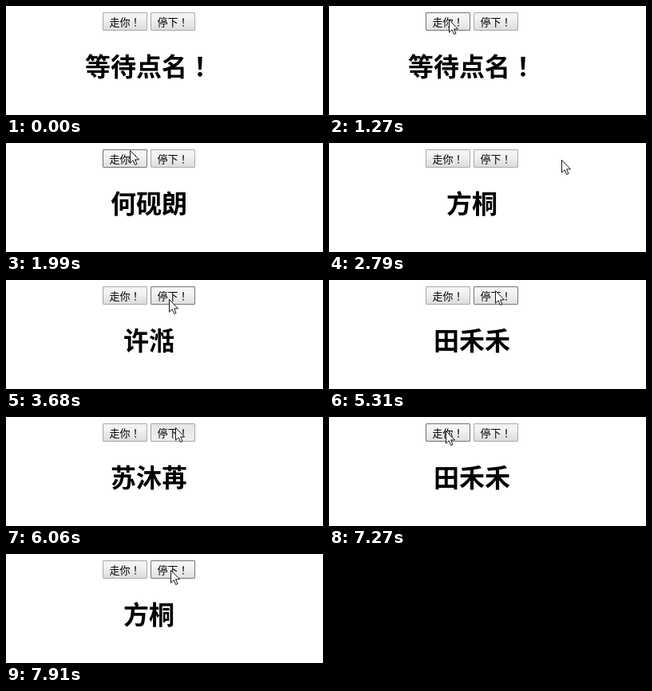
These frames come from a looping animation (397 by 137 pixels, 7.99 s). An HTML page:

```html
<!DOCTYPE html>
<html lang="zh-CN">
<head>
<meta charset="utf-8">
<title>点名</title>
<style>
  html, body { margin: 0; width: 100%; height: 100%; overflow: hidden; background: #fff; }
  #stage {
    position: relative; width: 397px; height: 137px; overflow: hidden; color: #000;
    font-family: "Noto Sans CJK SC", "Noto Sans CJK", sans-serif;
  }
  #stage i { font-style: normal; font-family: "Noto Sans CJK TC", "Noto Sans CJK JP", sans-serif; }
  .btn {
    position: absolute; top: 8px; box-sizing: border-box; width: 56px; height: 23px;
    border: 1px solid #a9a9a5; border-radius: 1px;
    background: linear-gradient(#f3f3f3 30%, #dcdcdc);
    font-size: 13px; line-height: 21px; text-align: center; white-space: nowrap;
  }
  .btn.hover { border-color: #70747c; background: linear-gradient(#f4f4f4 30%, #e0e0e0); }
  .btn.down { border-color: #a5a5a5; background: linear-gradient(#e6e6e6, #efefef); }
  #go { left: 121px; }
  #stop { left: 181px; }
  h1 {
    position: absolute; left: 0; top: 53px; width: 358px; margin: 0;
    font-size: 32px; line-height: 42px; font-weight: 700; text-align: center; white-space: nowrap;
  }
  #cursor { position: absolute; left: 0; top: 0; width: 13px; height: 20px; overflow: visible; }
</style>
</head>
<body>
<div id="stage">
  <div class="btn" id="go">走你<i lang="zh-TW">！</i></div>
  <div class="btn" id="stop">停下<i lang="zh-TW">！</i></div>
  <h1 id="name"></h1>
  <svg id="cursor" viewBox="0 0 13 20">
    <path d="M.5 .5V16.2L4.1 12.8L6.6 18.5L9 17.5L6.5 11.9H11.5Z" fill="#fff" stroke="#15151f"/>
  </svg>
</div>
<script>
const LOOP = 7990, ENTER = 690, MOVE_STEP = 64, ROLL_STEP = 70, HOLD = 200;
const WAITING = '等待点名<i lang="zh-TW">！</i>';
const pool = ['许湉', '田禾禾', '何砚朗', '陆苇', '周予棠', '沈知禾', '罗青屿', '方桐', '顾芃', '韩若汀', '苏沐苒'];

// Rolling spells, each with the name it stops on
const runs = [
  { from: 1450, to: 3680, last: '许湉' },
  { from: 4540, to: 5570, last: '罗青屿' },
  { from: 5750, to: 6060, last: '苏沐苒' },
  { from: 6950, to: 7910, last: '方桐' }
];
const clicks = [1450, 3480, 4540, 6060, 6950];

// Pointer moves: start, end, x, y
const entry = [325, 137];
const moves = [
  [ENTER, 1270, 150, 17],
  [1600, 1800, 155, 9],
  [2020, 2210, 291, 21],
  [2860, 3050, 213, 23],
  [3100, 3680, 204, 24],
  [4110, 4290, 146, 16],
  [4900, 5310, 208, 13],
  [5380, 5570, 212, 13],
  [6510, 6700, 146, 17],
  [7300, 7720, 206, 20]
];

const el = id => document.getElementById(id);
const cursor = el('cursor'), heading = el('name');
const buttons = [el('go'), el('stop')].map(node => ({ node, left: node.offsetLeft }));
const ease = f => f * f * (3 - 2 * f);

function tip(t) {
  let [x, y] = entry;
  for (const [start, end, tx, ty] of moves) {
    if (t < start) break;
    const seen = (Math.floor((t - start) / MOVE_STEP) + 1) * MOVE_STEP;
    const f = ease(Math.min(1, seen / (end - start)));
    x += (tx - x) * f;
    y += (ty - y) * f;
  }
  return [Math.round(x), Math.round(y)];
}

function label(t) {
  const i = runs.findLastIndex(run => t >= run.from);
  if (i < 0) return WAITING;
  const { from, to, last } = runs[i];
  if (t >= to) return last;
  const k = Math.floor((t - from) / ROLL_STEP);
  return pool[(k * 5 + i) % pool.length];
}

let shown = '';
function draw(t) {
  const text = label(t), [x, y] = tip(t), visible = t >= ENTER;
  if (text !== shown) heading.innerHTML = shown = text;
  cursor.style.display = visible ? 'block' : 'none';
  cursor.style.transform = `translate(${x}px, ${y}px)`;
  const pressed = clicks.some(c => t >= c && t < c + HOLD);
  for (const { node, left } of buttons) {
    const over = visible && x >= left && x < left + 56 && y >= 8 && y < 31;
    node.className = 'btn' + (over ? (pressed ? ' down' : ' hover') : '');
  }
}

const origin = performance.now();
function tick() {
  draw((performance.now() - origin) % LOOP);
  requestAnimationFrame(tick);
}
draw(0);
requestAnimationFrame(tick);
</script>
</body>
</html>
```
